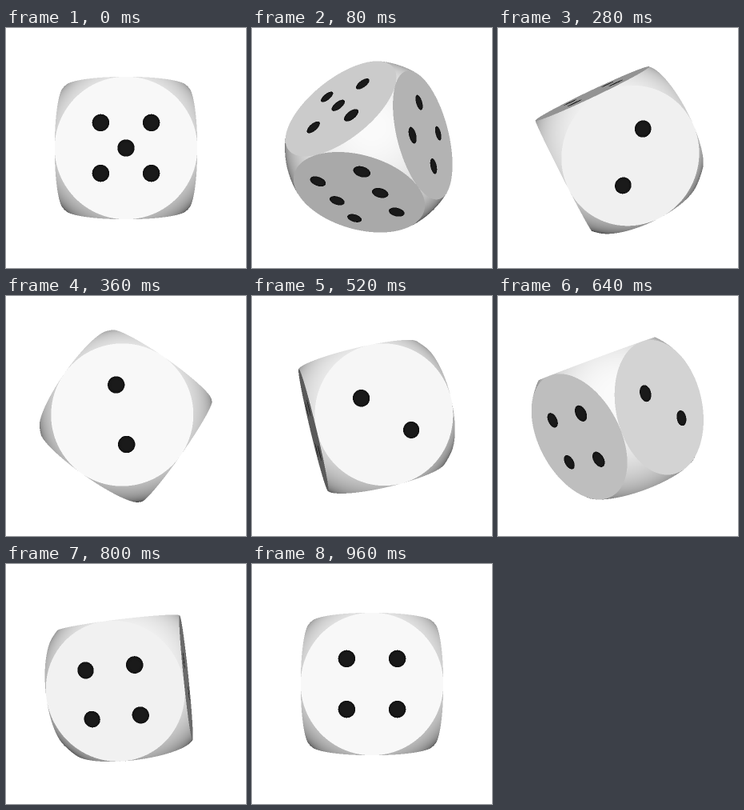
Animation, 300 px wide and 300 px high, one loop 1040 ms. Source, as an HTML page with a canvas:

```html
<!DOCTYPE html>
<html lang="en">
<head>
<meta charset="utf-8">
<title>Rolling die</title>
<style>
  html, body { margin: 0; width: 100%; height: 100%; overflow: hidden; background: #fff; }
  canvas { display: block; }
</style>
</head>
<body>
<canvas id="stage" width="300" height="300"></canvas>
<script>
const SIZE = 300, STEP = 40, LAST = 24, LOOP = 1040;
const DIST = 6.3, FOCAL = 89.2 * (DIST - 1);   // camera, in half edges of the cube and pixels
const PIP = 0.12, MARGIN = 36;
const ctx = document.getElementById('stage').getContext('2d');

// Pip centres per face, keyed by axis and side
const q = 0.354;
const four = [[-q, -q], [q, -q], [-q, q], [q, q]];
const six = [-0.395, 0.395].flatMap(a => [-0.5, 0, 0.5].map(b => [a, b]));
const faces = [
  { plus: [[0.3, -0.3], [-0.3, 0.3]], minus: [...four, [0, 0]] },
  { plus: six, minus: [[0, 0]] },
  { plus: four, minus: [[-q, -q], [0, 0], [q, q]] }
];

const dot = (a, b) => a[0] * b[0] + a[1] * b[1] + a[2] * b[2];

// Rows of Rx * Ry * Rz
function rotation(x, y, z) {
  const { sin, cos } = Math;
  const sx = sin(x), cx = cos(x), sy = sin(y), cy = cos(y), sz = sin(z), cz = cos(z);
  return [
    [cy * cz, -cy * sz, sy],
    [cx * sz + sx * sy * cz, cx * cz - sx * sy * sz, -sx * cy],
    [sx * sz - cx * sy * cz, sx * cz + cx * sy * sz, cx * cy]
  ];
}

function pipShade(axis, p) {
  const a = p[(axis + 1) % 3], b = p[(axis + 2) % 3];
  for (const [u, v] of faces[axis][p[axis] > 0 ? 'plus' : 'minus']) {
    const r = Math.hypot(a - u, b - v) / PIP;
    if (r < 1) return 26 - 14 * r ** 6;
  }
  return -1;
}

// Grey level seen along one ray: a cube cut by the sphere through its edge midpoints
function trace(eye, ray, lamp) {
  const rr = dot(ray, ray), b = dot(eye, ray), disc = b * b - rr * (dot(eye, eye) - 2);
  if (disc < 0) return 255;
  const root = Math.sqrt(disc);
  let near = (-b - root) / rr, far = (-b + root) / rr, axis = -1;
  for (let i = 0; i < 3; i++) {
    const side = Math.sign(ray[i]) || 1, d = ray[i] || 1e-9;
    const enter = (-side - eye[i]) / d, leave = (side - eye[i]) / d;
    if (enter > near) { near = enter; axis = i; }
    if (leave < far) far = leave;
  }
  if (near > far) return 255;

  const p = eye.map((e, i) => e + near * ray[i]);
  let normal;
  if (axis < 0) {
    normal = p.map(c => c / Math.SQRT2);
  } else {
    const pip = pipShade(axis, p);
    if (pip >= 0) return pip;
    normal = [0, 0, 0];
    normal[axis] = Math.sign(p[axis]);
  }
  return Math.min(250, 248 * Math.max(0, dot(normal, lamp)) ** 0.55);
}

function render(step) {
  const t = step / LAST;
  const turn = -Math.PI * (1 - 1.5 * t + t ** 3 / 2);
  const [right, down, front] = rotation(turn, 1.5 * turn, turn);
  const eye = front.map(c => c * DIST);
  const lamp = front.map((c, i) => c - 0.2 * down[i]);
  const image = ctx.createImageData(SIZE, SIZE);
  image.data.fill(255);
  for (let y = MARGIN; y < SIZE - MARGIN; y++) {
    for (let x = MARGIN; x < SIZE - MARGIN; x++) {
      let sum = 0;
      for (let k = 0; k < 4; k++) {
        const px = (x + 0.25 + (k & 1) / 2 - SIZE / 2) / FOCAL;
        const py = (y + 0.25 + (k >> 1) / 2 - SIZE / 2) / FOCAL;
        const ray = [0, 1, 2].map(i => right[i] * px + down[i] * py - front[i]);
        sum += trace(eye, ray, lamp);
      }
      image.data.fill(sum / 4, (y * SIZE + x) * 4, (y * SIZE + x) * 4 + 3);
    }
  }
  return image;
}

const cache = [];
let shown = -1;
function tick() {
  const step = Math.min(LAST, Math.floor(performance.now() % LOOP / STEP));
  if (step !== shown) {
    cache[step] ||= render(step);
    ctx.putImageData(cache[step], 0, 0);
    shown = step;
  }
  requestAnimationFrame(tick);
}
tick();
</script>
</body>
</html>
```
